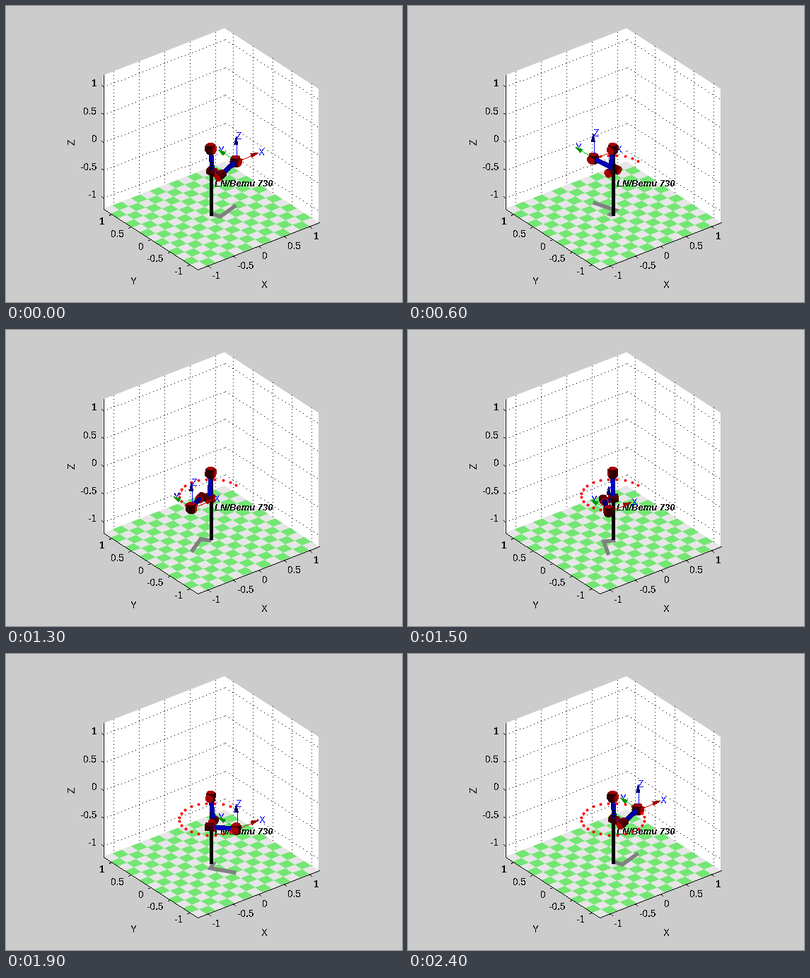
A matplotlib script for the animation above (2.5 s loop, 560 by 420 pixels).

```python
import numpy as np
import matplotlib
import matplotlib.pyplot as plt
from matplotlib.animation import FuncAnimation
from matplotlib.patches import Polygon

W, H, DPI = 560, 420, 100
PX = 72 / DPI
FRAMES, INTERVAL = 25, 100
LIM = 1.2

# Oblique view: screen vector of each unit axis, and direction to the viewer
ORIGIN = np.array([289.5, 202.75])
AXES = np.array([[71.67, -27.9], [-55.4, -35.8], [0, -79.0]])
VIEW = np.array([-0.527, -0.687, 0.5])
UP = np.array([0.0, 0.0, 1.0])

# Arm geometry
A2, A3, D3, D4 = 0.4318, 0.0203, 0.15005, 0.4318
RADIUS, HEIGHT = 0.5, -0.4
JOINT_R, JOINT_H = 0.062, 0.07
LINK_R = 0.032

plt.rcParams["font.family"] = "Liberation Sans"
plt.rcParams["text.antialiased"] = False

fig = plt.figure(figsize=(W / DPI, H / DPI), dpi=DPI, facecolor="#cccccc")
ax = fig.add_axes([0, 0, 1, 1])
ax.set_xlim(0, W)
ax.set_ylim(H, 0)
ax.axis("off")

moving = []


def project(p):
    return ORIGIN + np.asarray(p, float) @ AXES


def depth(p):
    return 10 + float(np.dot(p, VIEW))


def poly(points, color, z, smooth=False):
    patch = Polygon(project(points), closed=True, fc=color, lw=0,
                    aa=smooth, zorder=z)
    return ax.add_patch(patch)


def line(points, color, width, z, **kw):
    x, y = project(points).T
    return ax.plot(x, y, color=color, lw=width * PX, zorder=z, **kw)[0]


def thin(p, q, color, z, step=1):
    """Crisp line one pixel wide; a step above 1 makes it dotted."""
    a, b = project(p), project(q)
    n = int(round(np.abs(b - a).max()))
    t = np.arange(0, n + 1, step)[:, None] / max(n, 1)
    x, y = (np.round(a + (b - a) * t) + 0.5).T
    return ax.plot(x, y, ",", color=color, aa=False, zorder=z)[0]


def label(x, y, s, z=5, color="k", ha="left", va="baseline", size=13.5, **kw):
    return ax.text(x, y, s, fontsize=size * PX, color=color, ha=ha, va=va,
                   zorder=z, **kw)


def draw_stage():
    lo, hi = -LIM, LIM
    poly([(lo, hi, lo), (hi, hi, lo), (hi, lo, lo), (hi, lo, hi),
          (hi, hi, hi), (lo, hi, hi)], "w", 1, True)
    poly([(lo, lo, lo), (hi, lo, lo), (hi, hi, lo), (lo, hi, lo)],
         "#e6e6e6", 2, True)

    edge = np.linspace(lo, hi, 14)
    for i in range(13):
        for j in range(13):
            if (i + j) % 2:
                x0, x1, y0, y1 = edge[i], edge[i + 1], edge[j], edge[j + 1]
                poly([(x0, y0, lo), (x1, y0, lo), (x1, y1, lo), (x0, y1, lo)],
                     "#73e673", 2.5, True)

    for t in (-1, -0.5, 0, 0.5, 1):
        thin((t, hi, lo), (t, hi, hi), "k", 1.5, 5)
        thin((hi, t, lo), (hi, t, hi), "k", 1.5, 5)
        thin((lo, hi, t), (hi, hi, t), "k", 1.5, 5)
        thin((hi, hi, t), (hi, lo, t), "k", 1.5, 5)

        thin((t, lo, lo), (t, lo - 0.06, lo), "k", 3)
        thin((lo, t, lo), (lo - 0.05, t, lo), "k", 3)
        thin((lo, hi, t), (lo, hi + 0.06, t), "k", 3)
        s = f"{t:g}"
        x, y = project((t, lo, lo))
        label(x + 7, y + 18.5, s)
        x, y = project((lo, t, lo))
        label(x - 8.5, y + 14.5, s, ha="right")
        x, y = project((lo, hi, t))
        label(x - 8.5, y, s, ha="right")

    corners = [(lo, hi, hi), (lo, hi, lo), (lo, lo, lo), (hi, lo, lo)]
    for p, q in zip(corners[:-1], corners[1:]):
        thin(p, q, "k", 3)
    label(365.5, 400.5, "X", ha="center")
    label(180.5, 395, "Y", ha="center")
    label(93.5, 193, "Z", ha="center", va="center", rotation=90)

    # Pole is cut into short pieces so the arm can pass in front or behind
    cuts = np.linspace(lo, 0, 25)
    for z0, z1 in zip(cuts[:-1], cuts[1:]):
        mid = (0, 0, (z0 + z1) / 2)
        line([(0.007, 0, z0), (0.007, 0, z1)], "k", 3.4, depth(mid),
             solid_capstyle="butt", aa=False)
    label(295, 255.5, "LN/Bemu 730", z=depth((0, 0, -0.61)), size=13,
          weight="bold", style="italic")


def joint_shade(n):
    return ((42 + 55 * max(0, n[2])) / 255, 0, 0)


def link_shade(n):
    return (0, 0, 0.15 + 0.7 * max(0, n @ VIEW))


def tube(p, q, r, shade, cap=None, sides=12, cuts=4):
    """Cylinder from p to q; only faces turned to the viewer are drawn."""
    axis = (q - p) / np.linalg.norm(q - p)
    helper = UP if abs(axis[2]) < 0.9 else np.array([1.0, 0, 0])
    u = np.cross(axis, helper)
    u /= np.linalg.norm(u)
    v = np.cross(axis, u)

    def around(k):
        a = 2 * np.pi * k / sides
        return np.cos(a) * u + np.sin(a) * v

    for k in range(sides):
        n, a, b = around(k + 0.5), r * around(k), r * around(k + 1)
        if n @ VIEW > 0:
            for c in range(cuts):
                s = p + (q - p) * c / cuts
                e = p + (q - p) * (c + 1) / cuts
                quad = np.array([s + a, e + a, e + b, s + b])
                moving.append(poly(quad, shade(n), depth(quad.mean(axis=0))))
        if cap:
            end = q if axis @ VIEW > 0 else p
            tri = np.array([end, end + a, end + b])
            moving.append(poly(tri, cap, depth(tri.mean(axis=0))))


def joint(p, axis):
    tube(p - JOINT_H * axis, p + JOINT_H * axis, JOINT_R, joint_shade, "#a80000")


def link(p, q, cuts=8):
    tube(p, q, LINK_R, link_shade, sides=10, cuts=cuts)


def solve(theta):
    """Elbow, forearm start, wrist, sideways axis and forearm axis."""
    wrist = np.array([RADIUS * np.cos(theta), RADIUS * np.sin(theta), HEIGHT])
    phi = theta + np.arcsin(D3 / RADIUS)
    radial = np.array([np.cos(phi), np.sin(phi), 0])
    side = np.array([np.sin(phi), -np.cos(phi), 0])
    reach = np.sqrt(RADIUS**2 - D3**2)
    dist, fore = np.hypot(reach, HEIGHT), np.hypot(A3, D4)
    bend = np.arccos((A2**2 + dist**2 - fore**2) / (2 * A2 * dist))
    q2 = np.arctan2(HEIGHT, reach) - bend
    ex, ez = A2 * np.cos(q2), A2 * np.sin(q2)
    q3 = np.arctan2(HEIGHT - ez, reach - ex) + np.arctan2(A3, D4)
    along = np.cos(q3) * radial + np.sin(q3) * UP
    return ex * radial + ez * UP, wrist - D4 * along, wrist, side, along


def draw_tool_axes(p):
    parts = zip("XYZ", np.eye(3),
                ("#d00000", "#00c800", "#0000ff"),
                ("#960000", "#009600", "#00006e"))
    for name, d, color, dark in parts:
        for s in np.arange(0, 0.3, 0.05):
            moving.append(thin(p + s * d, p + (s + 0.05) * d, color,
                               depth(p + (s + 0.025) * d)))
        tip, base = project(p + 0.44 * d), project(p + 0.3 * d)
        t = (tip - base) / np.linalg.norm(tip - base)
        n = 2.6 * np.array([-t[1], t[0]])
        head = Polygon([tip, base + n, base - n], fc=dark, lw=0, aa=False,
                       zorder=depth(p + 0.36 * d))
        moving.append(ax.add_patch(head))
        x, y = project(p + 0.45 * d)
        moving.append(label(x - 0.5, y + 4.5, name, z=depth(p + 0.45 * d),
                            color="b"))


def update(i):
    for artist in moving:
        artist.remove()
    moving.clear()

    step = 2 * np.pi / (FRAMES - 1)
    base = np.zeros(3)
    elbow, start, wrist, side, along = solve(i * step)

    floor = np.array([base, elbow, start, wrist])
    floor[:, 2] = -LIM + 0.01
    moving.append(line(floor, "#808080", 5.5, 4, solid_capstyle="butt",
                       solid_joinstyle="miter"))

    for k in range(i):
        p = solve(k * step)[2]
        x, y = project(p)
        moving.append(ax.plot(x, y, "o", ms=4 * PX, mew=0, color="r",
                              aa=False, zorder=depth(p))[0])

    link(base, elbow)
    link(elbow, start, 4)
    link(start, wrist)
    for p, axis in ((base, UP), (base, side), (elbow, side),
                    (start, along), (wrist, side), (wrist, UP)):
        joint(p, axis)
    draw_tool_axes(wrist)
    return moving


draw_stage()
anim = FuncAnimation(fig, update, frames=FRAMES, interval=INTERVAL,
                     init_func=lambda: [], repeat=True, repeat_delay=0, blit=False)
plt.show()
```
